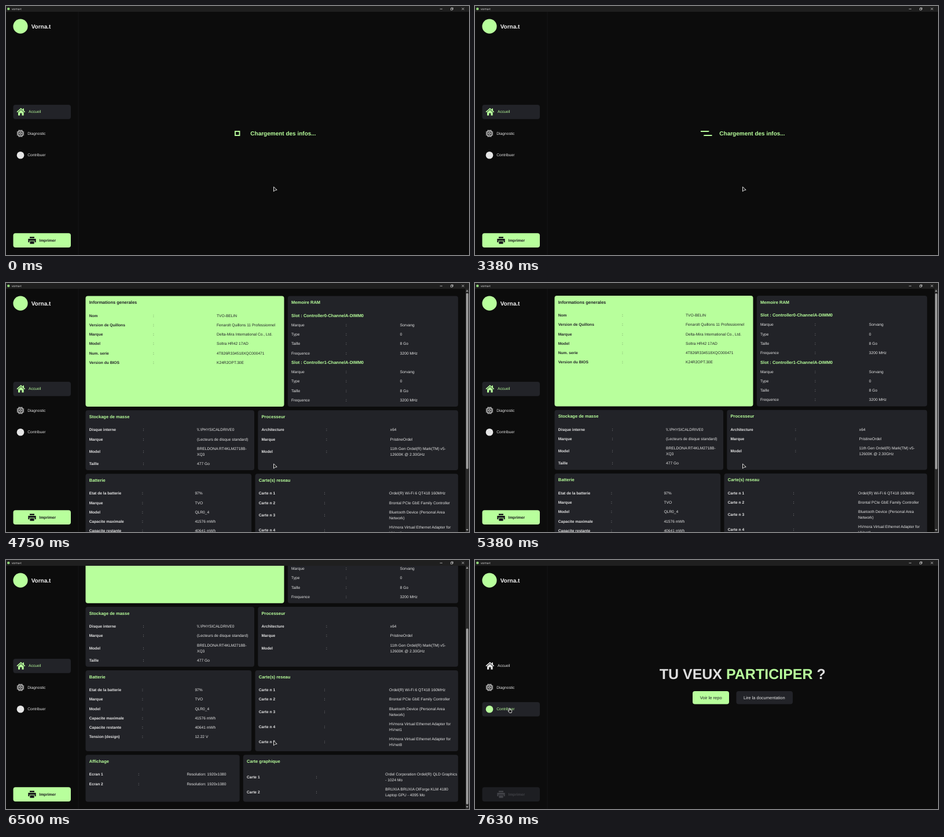
Animation of 800x431 px, one loop 8 s. Source, as an HTML page:

```html
<!DOCTYPE html>
<html lang="fr">
<head>
<meta charset="utf-8">
<title>vorna-t</title>
<style>
html, body { margin: 0; height: 100%; overflow: hidden; background: #0c0c0c; }
svg { display: block; width: 100vw; height: 100vh; }
text { font-family: "Liberation Sans", Arial, sans-serif; font-size: 6.667px; text-rendering: geometricPrecision; white-space: pre; }
.bold { font-weight: 700; }
.off { display: none; }
</style>
</head>
<body>
<svg viewBox="0 0 800 431">
  <defs><clipPath id="view"><rect x="125" y="10" width="675" height="421"/></clipPath></defs>
  <rect width="800" height="431" fill="#0c0c0c"/>
  <path d="M125 10V431" stroke="#18181a" stroke-width=".8"/>

  <g id="loading" fill="#b8ff9c">
    <g fill="none" stroke="#b8ff9c" stroke-width="1.9" stroke-dasharray="14.5 99">
      <path class="snake" d="M390 217H403.5V224H390"/>
      <path class="snake" d="M409.5 224H396V217H409.5"/>
    </g>
    <text x="422.3" y="223.9" class="bold" style="font-size:10px">Chargement des infos...</text>
  </g>

  <g id="infos" clip-path="url(#view)">
    <g id="cards"></g>
    <rect x="794" y="10" width="6" height="421" fill="#2a2a2a"/>
    <path d="M794.8 15L796.8 11.8L798.8 15ZM794.8 426L796.8 429.2L798.8 426Z" fill="#a0a0a0"/>
    <rect id="thumb" x="795" y="17.5" width="3.8" height="304.5" rx="1.9" fill="#9d9d9d"/>
  </g>

  <g id="join">
    <text x="318.7" y="206.2" class="bold" style="font-size:25px" fill="#dedede">TU VEUX <tspan fill="#b8ff9c">PARTICIPER</tspan> ?</text>
    <rect x="376" y="227" width="63" height="22.5" rx="4" fill="#b8ff9c"/>
    <text x="388.7" y="240.8" style="font-size:7.5px" fill="#222328">Voir le repo</text>
    <rect x="451.5" y="227" width="97.5" height="22.5" rx="4" fill="#222328"/>
    <text x="464" y="240.8" style="font-size:7.5px" fill="#e6e6e6">Lire la documentation</text>
  </g>

  <circle cx="25" cy="35.2" r="12.6" fill="#b8ff9c"/>
  <text x="43.7" y="38.5" class="bold" style="font-size:10px" fill="#f0f0f0">Vorna.t</text>

  <g id="home">
    <rect x="12.5" y="171" width="99.5" height="24.7" rx="4"/>
    <path d="M19 183.6L25.8 177.6L32.6 183.6" fill="none" stroke="currentColor" stroke-width="1.5"/>
    <path d="M29 177.4H31V181.5L29 179.7ZM25.8 179.7L30.6 184V189.6H27.4V185.6H24.2V189.6H21V184Z" fill="currentColor"/>
    <text x="39" y="185.4" fill="currentColor">Accueil</text>
  </g>
  <g color="#e6e6e6">
    <g fill="none" stroke="currentColor">
      <rect x="21" y="216.6" width="8" height="8" rx="1" stroke-width="1.3"/>
      <rect x="23.5" y="219.1" width="3" height="3" stroke-width="1.1"/>
      <path d="M22.6 214.3V216M25 214.3V216M27.4 214.3V216M22.6 225.2V226.9M25 225.2V226.9M27.4 225.2V226.9M18.7 218.2H20.4M18.7 220.6H20.4M18.7 223H20.4M29.6 218.2H31.3M29.6 220.6H31.3M29.6 223H31.3"/>
    </g>
    <text x="37.3" y="222.7" fill="currentColor">Diagnostic</text>
  </g>
  <g id="contrib">
    <rect x="12.5" y="246" width="99.5" height="24.7" rx="4"/>
    <circle cx="25" cy="258.2" r="6.3" fill="currentColor"/>
    <text x="37.3" y="260.3" fill="currentColor">Contribuer</text>
  </g>
  <g id="print">
    <rect x="12.5" y="393.2" width="99.5" height="24.8" rx="4"/>
    <path d="M41 402V399.4H49V402ZM38.3 403H51.7V409H49.6V406.2H40.4V409H38.3ZM41.4 407.2H48.6V411.8H41.4Z" fill="currentColor"/>
    <text x="57.6" y="407.9" class="bold" fill="currentColor">Imprimer</text>
  </g>

  <rect width="800" height="10" fill="#1f1f1f"/>
  <circle cx="4.3" cy="5" r="2.3" fill="#8fd478"/>
  <text x="10" y="6.8" style="font:5px 'Open Sans',sans-serif" fill="#f0f0f0">vorna-t</text>
  <path d="M749.7 5.2H754M768.4 4H771.4V7H768.4ZM769.4 4V3H772.4V6H771.4M787.5 3L791.5 7M791.5 3L787.5 7" fill="none" stroke="#dcdcdc" stroke-width=".7"/>

  <g id="cursor" fill="#111" stroke="#f2f2f2" stroke-width=".9" stroke-linejoin="round">
    <path id="arrow" d="M0 0V8L2.2 6L5.7 5.3Z"/>
    <path id="hand" d="M-.8 .5Q0 -.6 .8 .5V3L3.4 3.6Q4.2 4 4 5L3.3 8H-.2L-2.6 5Q-2.4 4-.8 5Z"/>
  </g>
</svg>
<script>
const $ = id => document.getElementById(id);
const GREEN = "#b8ff9c", PANEL = "#222328", WHITE = "#e6e6e6";
const LINE = 16.25, TALL = 26, MAX_SCROLL = 139.2;

const put = html => $("cards").insertAdjacentHTML("beforeend", html);

function text(x, mid, str, fill, bold, size = 6.667) {
  put(`<text x="${x}" y="${mid + size * 0.36}" fill="${fill}" style="font-size:${size}px" class="${bold ? "bold" : ""}">${str}</text>`);
}

// rows: [label, value line, optional second line]; a lone label is a subtitle
function card(x, y, right, bottom, colon, value, title, rows, { bg = PANEL, ink = WHITE, head = GREEN, bold = true } = {}) {
  put(`<rect x="${x}" y="${y}" width="${right - x}" height="${bottom - y}" rx="4" fill="${bg}"/>`);
  const left = x + 6.25;
  text(left, y + 11.1, title, head, true, 7.5);
  let top = y + 25.6;
  for (const [label, ...lines] of rows) {
    const height = lines.length > 1 ? TALL : LINE, mid = top + height / 2;
    if (lines.length) {
      text(left, mid, label, ink, bold);
      text(colon, mid, ":", ink);
      lines.forEach((s, i) => text(value, mid + (i - (lines.length - 1) / 2) * 10, s, ink));
    } else text(left, mid, label, head, true, 7.5);
    top += height;
  }
}

const slot = n => [[`Slot : Controller${n}-ChannelA-DIMM0`], ["Marque", "Sorvang"], ["Type", "0"], ["Taille", "8 Go"], ["Frequence", "3200 MHz"]];

card(137.5, 22.6, 480.5, 214, 254, 364, "Informations generales", [
  ["Nom", "TVO-BELIN"],
  ["Version de Quillons", "Fenarolt Quillons 11 Professionnel"],
  ["Marque", "Delta-Mira International Co., Ltd."],
  ["Model", "Soltra HR42 17AD"],
  ["Num. serie", "4T826R334518XQC000471"],
  ["Version du BIOS", "K24R2OPT.30E"]
], { bg: GREEN, ink: PANEL, head: PANEL });
card(486.8, 22.6, 781.2, 214, 587, 680.8, "Memoire RAM", [...slot(0), ...slot(1)], { bold: false });
card(137.5, 220.3, 429, 324, 236.8, 330, "Stockage de masse", [
  ["Disque interne", "\\\\.\\PHYSICALDRIVE0"],
  ["Marque", "(Lecteurs de disque standard)"],
  ["Model", "BRELDONA RT4KLM2718B-", "XQ3"],
  ["Taille", "477 Go"]
]);
card(435.3, 220.3, 781.2, 324, 553, 663.8, "Processeur", [
  ["Architecture", "x64"],
  ["Marque", "PristineOrdel"],
  ["Model", "11th Gen Ordel(R) Mark(TM) v5-", "12600K @ 2.30GHz"]
]);
card(137.5, 330.3, 424.2, 470.3, 235, 326.4, "Batterie", [
  ["Etat de la batterie", "97%"],
  ["Marque", "TVO"],
  ["Model", "QLR0_4"],
  ["Capacite maximale", "41576 mWh"],
  ["Capacite restante", "40641 mWh"],
  ["Tension (design)", "12.22 V"]
]);
card(430.5, 330.3, 781.2, 470.3, 549.5, 662, "Carte(s) reseau", [
  ["Carte n 1", "Ordel(R) Wi-Fi 6 QT418 160MHz"],
  ["Carte n 2", "Brontal PCIe GbE Family Controller"],
  ["Carte n 3", "Bluetooth Device (Personal Area", "Network)"],
  ["Carte n 4", "HVmora Virtual Ethernet Adapter for", "HVnet1"],
  ["Carte n 5", "HVmora Virtual Ethernet Adapter for", "HVnet8"]
]);
card(137.5, 476.5, 403.7, 557.7, 228.2, 312.4, "Affichage", [
  ["Ecran 1", "Resolution: 1920x1080"],
  ["Ecran 2", "Resolution: 1920x1080"]
]);
card(409.8, 476.5, 781.2, 557.7, 535.5, 655.3, "Carte graphique", [
  ["Carte 1", "Ordel Corporation Ordel(R) QLD Graphics", "- 1024 Mo"],
  ["Carte 2", "BRUXIA BRUXIA OlForge KLM 4180", "Laptop GPU - 4095 Mo"]
]);

function ease(t, from, to) {
  const x = Math.min(1, Math.max(0, (t - from) / (to - from)));
  return x < 0.5 ? 4 * x ** 3 : 1 - 4 * (1 - x) ** 3;
}

const show = (id, on) => $(id).classList.toggle("off", !on);

function paint(id, bg, color) {
  $(id).style.color = color;
  $(id).firstElementChild.setAttribute("fill", bg);
}

const nav = (id, on) => paint(id, on ? PANEL : "none", on ? GREEN : WHITE);

function draw(t) {
  const joined = t >= 7500, loaded = t >= 3625;
  show("loading", !loaded);
  show("infos", loaded && !joined);
  show("join", joined);

  const slide = 9.75 - 10.2 * Math.sin(t / 1500 * 2 * Math.PI);
  document.querySelectorAll(".snake").forEach(s => s.setAttribute("stroke-dashoffset", -slide));

  const scroll = ease(t, 5310, 6000) - ease(t, 6490, 7050);
  $("cards").setAttribute("transform", `translate(0 ${-scroll * MAX_SCROLL})`);
  $("thumb").setAttribute("y", 17.5 + scroll * 101);

  const move = ease(t, 6950, 7350), nudge = ease(t, 7400, 7600);
  const x = 462.5 - 399.5 * move - 3.3 * nudge, y = 313 - 56 * move - 0.6 * nudge;
  const hover = x > 12.5 && x < 112 && y > 246 && y < 270.7;
  $("cursor").setAttribute("transform", `translate(${x} ${y})`);
  show("arrow", !hover);
  show("hand", hover);

  nav("home", !joined);
  nav("contrib", hover || joined);
  paint("print", joined ? "#1d1e22" : GREEN, joined ? "#414247" : "#17181b");
}

function tick() {
  draw(performance.now() % 8000);
  requestAnimationFrame(tick);
}
tick();
</script>
</body>
</html>
```
